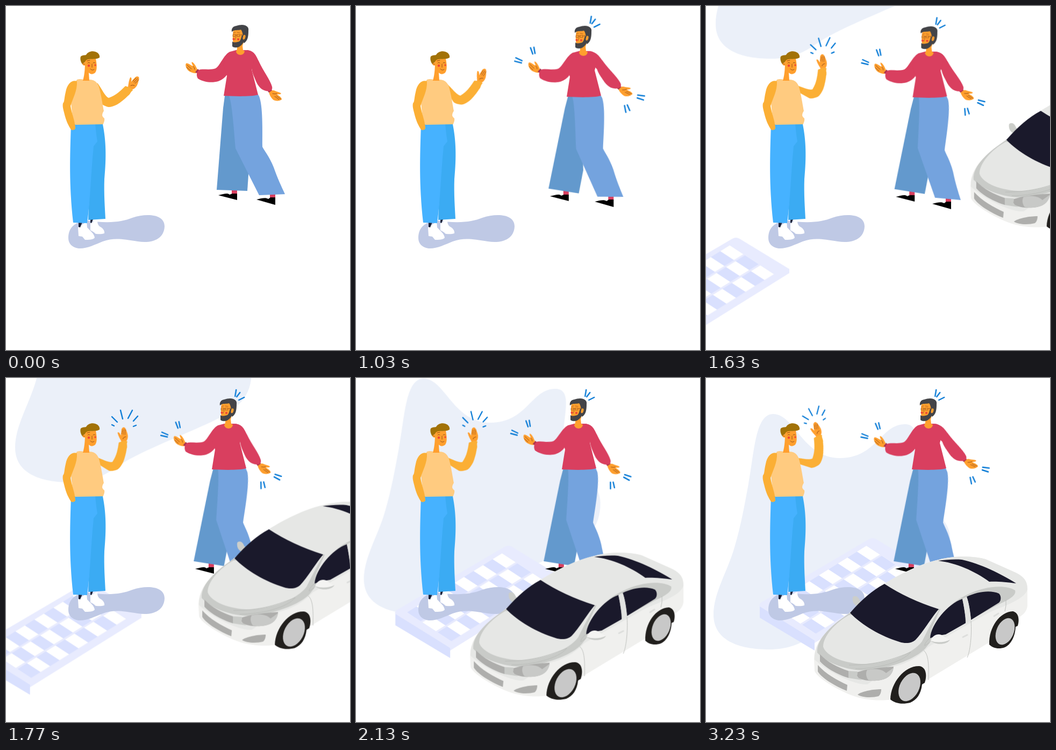
Recreate the animation shown at these times as an HTML page without scripts. Size 640 by 640 pixels, loop 5.16 s.

```html
<!DOCTYPE html>
<html lang="en">
<head>
<meta charset="utf-8">
<title>Two friends and a car</title>
<style>
html, body { margin: 0; width: 100%; height: 100%; overflow: hidden; background: #fff; }
svg { display: block; width: 100%; height: 100%; }

.move { animation: 5160ms linear infinite; }
.blob { animation-name: blob; }
.keyboard { animation-name: keyboard; }
.car { animation-name: car; }
.walker { animation-name: walk; }
.leg-b { animation-name: leg-b; transform-origin: 415px 170px; }
.foot-b { animation-name: foot-b; transform-origin: 426px 343px; }
.leg-f { animation-name: leg-f; transform-origin: 445px 170px; }
.foot-f { animation-name: foot-f; transform-origin: 496px 351px; }
.arm-l { animation-name: arm-l; transform-origin: 418px 95px; }
.arm-r { animation-name: arm-r; transform-origin: 458px 93px; }
.wave { animation-name: wave; transform-origin: 172px 153px; }
.pop { animation-name: pop; }
.grow { animation-name: grow; transform-origin: 219px 101px; }

@keyframes blob {
  0%, 25.48% { transform: translate(5px, -520px); animation-timing-function: cubic-bezier(.333, 0, .667, 1); }
  45.83%, 100% { transform: none; }
}
@keyframes keyboard {
  0%, 28.1% { transform: translate(-430px, 225px); animation-timing-function: cubic-bezier(.333, 1, .667, 1); }
  49.96%, 100% { transform: none; }
}
@keyframes car {
  0%, 26.86% { transform: translate(676px, -437px); animation-timing-function: cubic-bezier(.333, 1, .667, 1); }
  46.24%, 100% { transform: none; }
}
@keyframes walk { 0% { transform: none; } 33.72%, 100% { transform: translate(-22px, 3px); } }
@keyframes leg-b { 0% { transform: rotate(0deg); } 18.99%, 100% { transform: rotate(7deg); } }
@keyframes foot-b { 0% { transform: rotate(0deg); } 18.99%, 100% { transform: rotate(-7deg); } }
@keyframes leg-f { 0%, 13.5% { transform: rotate(0deg); } 33.72%, 100% { transform: rotate(8.5deg); } }
@keyframes foot-f { 0%, 13.5% { transform: rotate(0deg); } 33.72%, 100% { transform: rotate(-8.5deg); } }
@keyframes arm-l {
  0% { transform: rotate(0deg); }
  12.21% { transform: rotate(2.6deg); }
  27.71% { transform: rotate(2deg); }
  34.3% { transform: rotate(1deg); }
  37.4% { transform: rotate(3deg); }
  49.03% { transform: rotate(2.8deg); }
  62.6%, 100% { transform: rotate(-.6deg); }
}
@keyframes arm-r {
  0%, 12.21% { transform: rotate(0deg); }
  19.96% { transform: rotate(-11deg); }
  27.71% { transform: rotate(-9.3deg); }
  34.3% { transform: rotate(-1deg); }
  37.4%, 39% { transform: rotate(2.5deg); }
  49.03% { transform: rotate(-10.4deg); }
  51.74%, 100% { transform: rotate(-11.5deg); }
}
@keyframes wave {
  0%, 14.34% { transform: rotate(0deg); }
  27.71% { transform: rotate(-28deg); }
  32% { transform: rotate(-40deg); }
  34.3% { transform: rotate(-36.5deg); }
  37.4%, 39.34% { transform: rotate(-33.5deg); }
  49.03% { transform: rotate(-46.5deg); }
  55.23% { transform: rotate(-57deg); }
  62.6%, 100% { transform: rotate(-50.5deg); }
}
@keyframes pop {
  0%, 12.6% { transform: scale(0); }
  17.44% { transform: scale(1.2); }
  20.74%, 100% { transform: scale(1); }
}
@keyframes grow {
  0%, 23% { transform: scale(0); }
  27.71% { transform: scale(.55); }
  32%, 34.3% { transform: scale(1); }
  49.03%, 100% { transform: scale(.89); }
}

.marks { fill: none; stroke: #0a7bd6; stroke-width: 2.4; stroke-linecap: round; }
.ink { fill: none; stroke: #7d3d14; stroke-width: .8; stroke-linecap: round; }
.seam { fill: none; stroke: #b9bbb8; stroke-width: .9; }
.skin { fill: #ff9f2e; }
.sleeve { fill: #fbaf35; }
.red { fill: #d93f5f; }
.cuff { fill: #a9324f; }
.cheek { fill: #ef4436; }
.dark { fill: #434448; }
.glass { fill: #1a192b; }
.paint { fill: #e6e7e5; }
.trim { fill: #c9cbc8; }
.vent { fill: #aeaeac; }
.tyre { fill: #211f1d; }
.rim { fill: #c8c8c8; }
</style>
</head>
<body>
<svg viewBox="0 0 640 640">
  <defs>
    <pattern id="keys" width="2" height="2" patternUnits="userSpaceOnUse">
      <path fill="#d9e0fe" d="M0 .06h1v.88h-1zM1 1.06h1v.88h-1z"/>
      <path fill="#fff" d="M1 .06h1v.88h-1zM0 1.06h1v.88h-1z"/>
    </pattern>
  </defs>

  <path class="move blob" fill="#ebf0f9" d="M79 197C90 140 91 67 125 67C165 67 180 149 249 149C318 149 325 86 370 86C385 86 390 96 390 112C390 140 380 175 387 205C395 240 454 250 454 298C454 345 430 368 380 392C320 420 240 450 200 478C175 496 150 505 118 505C60 505 14 488 14 440C14 400 40 360 53 315C65 275 72 235 79 197Z"/>

  <g class="move keyboard">
    <path fill="#d9e0fe" d="M100 423L202 488V507L100 446Z"/>
    <path fill="#e8ebfe" d="M102 418L303 300Q310 296 317 300L409 356V364L202 493V488L100 425Q98 421 102 418Z"/>
    <rect width="10" height="3" fill="url(#keys)" transform="matrix(17.7 -11 28.5 18.6 120 421)"/>
  </g>

  <g id="greeter">
    <path fill="#bfc9e5" d="M116 432C116 410 130 402 150 399C190 405 215 402 235 394C262 385 295 387 295 410C294 435 270 442 245 438C215 433 200 431 180 438C165 444 150 452 135 451C122 449 116 441 116 432Z"/>
    <path fill="#fff" d="M134 412L150 401L151 412C157 419 164 423 165 431C163 435 153 435 147 435L142 429L135 428Z"/>
    <path fill="#fff" d="M157 404L170 398C170 404 171 407 174 410C180 413 184 418 183 423C178 425 170 424 167 424C163 420 160 419 157 417Z"/>
    <path fill="#1b2238" d="M135 402H142L138 412L135 411ZM157 397H162L159 404L157 403Z"/>
    <path fill="#3babf3" d="M160 220H180C186 250 187 280 183 322C182 350 184 375 185 396L153 398Z"/>
    <path fill="#46b2ff" d="M121 220H166C167 230 168 241 170 252L163 261C158 310 157 360 151 404L125 403C117 330 119 280 121 220Z"/>

    <g class="move wave">
      <path class="skin" d="M227 151C228 143 229 137 231 133C234 132 234 137 233 141C237 136 241 131 244 131C248 131 248 134 247 138C245 146 243 151 238 154C235 156 231 155 227 151Z"/>
      <path class="ink" d="M236 140L242 134M238 142L245 135M240 144L247 137M232 148Q236 146 239 148"/>
      <path class="sleeve" d="M170 143C179 155 184 168 191 171C205 166 213 158 222 149C230 151 235 153 236 157C231 160 231 165 227 167C212 182 200 188 191 188C184 187 177 182 176 180L168 160Z"/>
      <g transform="rotate(36.5 172 153)">
        <path class="move marks grow" d="M197 72L207 82M213 60L217 76M235 60L227 75M245 71L237 80M197 87L201 89M237 90L242 88"/>
      </g>
    </g>

    <path fill="#ffcb80" d="M132 137C140 134 144 138 150 138C158 135 168 138 172 148C176 158 180 185 182 195C178 202 178 205 183 209C184 214 181 218 181 220L129 221C122 210 123 190 120 175C124 160 126 150 128 143Z"/>
    <path class="sleeve" d="M132 140C124 137 114 143 111 160C108 172 109 178 106 181C105 186 106 190 108 198C112 215 116 222 121 230C125 232 128 230 129 228C129 215 122 200 120 186C124 172 133 158 132 140Z"/>
    <path class="skin" d="M147 99L167 98C169 108 170 119 166 124C161 128 157 127 154 124L155 139H143C147 125 147 112 147 99Z"/>
    <path fill="#a27207" d="M144 110C140 107 137 99 139 94C142 91 146 92 149 91C152 85 160 83 166 85C172 87 175 91 174 96C168 100 160 98 154 99C148 99 147 104 144 110Z"/>
    <circle class="skin" cx="145.500" cy="108" r="2.800"/>
    <circle class="cheek" cx="154" cy="111" r="2.200"/><circle class="cheek" cx="166" cy="110" r="1.700"/>
    <path class="ink" d="M152 106Q154 104 156 106M162 106Q164 104 166 106M160 108V114M157 117Q160 121 164 118M151 102L156 101M144 107L146 109"/>
  </g>

  <g class="move walker">
    <g class="move leg-b">
      <g class="move foot-b">
        <path class="red" d="M420 340H430V350H420Z"/>
        <path d="M395 352C405 350 412 347 416 351L421 349H430V361Z"/>
      </g>
      <path fill="#6399cd" d="M408 160L404 190L392 342L449 344L452 300L430 160Z"/>
    </g>
    <g class="move leg-f">
      <g class="move foot-f">
        <path class="red" d="M491 348H501V357H491Z"/>
        <path d="M466 360C476 357 484 356 488 359L492 356H501V370Z"/>
      </g>
      <path fill="#74a3de" d="M413 160H466L471 168C478 186 477 230 477 262C480 268 490 280 498 300C505 320 512 335 519 350L471 352L427 265C424 230 421 190 417 174Z"/>
    </g>

    <g class="move arm-r">
      <path class="skin" d="M489 160C493 156 497 156 501 158C505 160 510 160 512 163C510 165 507 164 504 164C509 168 513 170 513 174C509 177 502 177 498 175C493 171 490 165 489 160Z"/>
      <path class="ink" d="M496 163Q500 164 504 163M500 168L508 174M503 167L511 173"/>
      <path class="cuff" d="M486 157L492 151L495 157L489 161Z"/>
      <path class="red" d="M448 82C462 83 465 92 470 102C478 120 492 138 495 150C497 158 489 159 484 158C475 156 470 150 466 142C462 132 458 125 457 116L446 100Z"/>
      <g transform="rotate(9.300 458 93) translate(18 -2)">
        <path class="move marks pop" style="transform-origin:494px 162px" d="M516 168L528 170M515 173L526 177M492 186L494 198M497 185L501 195"/>
      </g>
    </g>

    <g class="move arm-l">
      <path class="skin" d="M356 118C353 111 350 106 346 104C344 106 348 110 348 112C343 110 337 105 335 107C333 110 335 115 338 119C342 123 348 125 354 125Z"/>
      <path class="ink" d="M337 110L345 117M336 114L343 120M348 112Q351 114 351 118"/>
      <path class="cuff" d="M352 123L357 117L361 121L357 126Z"/>
      <path class="red" d="M417 85C405 90 398 112 390 116C380 120 365 116 359 119C354 123 354 130 357 135C370 143 385 143 395 140C403 137 408 132 411 128L425 100Z"/>
      <g transform="rotate(-2 418 95) translate(18 -2)">
        <path class="move marks pop" style="transform-origin:327px 115px" d="M294 98L305 103M292 104L304 107M320 80L324 91M326 79L328 90"/>
      </g>
    </g>

    <path class="red" d="M405 167L411 130L404 108C408 96 412 87 417 85L428 82H445C455 81 462 88 463 95L457 118L469 165C455 169 425 168 405 167Z"/>
    <path class="skin" d="M423 45L441 42L443 62C443 66 441 70 440 74L441 82L444 84C443 93 430 93 428 85L430 80V74H426C421 70 421 55 423 45Z"/>
    <path class="dark" d="M421 66C424 69 430 67 434 66C437 63 438 58 439 53L445 60C443 66 440 72 435 75C431 78 424 78 421 75Z"/>
    <path class="dark" d="M420 48C419 42 422 38 428 37C434 35 440 34 445 36C449 38 452 40 451 46C451 56 450 64 443 69C440 66 441 60 441 55C440 50 439 46 437 44C431 46 426 43 420 48Z"/>
    <ellipse class="skin" cx="443" cy="58" rx="2.300" ry="4.500" transform="rotate(15 443 58)"/>
    <circle class="cheek" cx="423.500" cy="61.500" r="2"/><circle class="cheek" cx="432" cy="62" r="2"/>
    <path class="ink" stroke-opacity=".7" d="M422.500 53h4.500v3.500h-4.500zM430 53h5v3.500h-5zM427 54H430M435 54L440 53M423 50L427 49M430 49L435 50M428 57L426 63M424 70Q427 73 430 70"/>
    <g transform="translate(17.200 -2)">
      <path class="move marks pop" style="transform-origin:420px 52px" d="M433 21L431 33M440 26L434 34M448 35L438 40"/>
    </g>
  </g>

  <g class="move car">
    <path fill="#ccceca" d="M273 408C277 403 284 407 286 414L292 420L280 424C274 421 272 414 273 408Z"/>
    <path fill="#f0f0ee" d="M201 522C202 500 212 482 232 466L332 383C360 365 400 345 433 338C460 330 500 331 520 337L576 362C592 370 598 378 598 392V424C597 434 590 441 581 446L530 490L406 565L345 598C320 602 290 598 270 590C240 578 205 556 202 545Z"/>
    <path class="paint" d="M202 516C204 500 214 480 232 466L332 383C360 365 400 345 433 338C460 330 500 331 520 337L576 362C592 370 598 378 598 394C590 415 550 424 520 440L414 500C395 520 372 532 349 537L300 570C275 572 225 545 202 524Z"/>
    <path class="trim" d="M268 437C235 458 205 485 207 511C225 532 270 546 300 544C345 540 398 520 412 498L420 488L470 462L545 421C565 412 578 404 575 395C558 384 520 386 486 403C455 417 435 440 416 474L436 430Z"/>
    <path class="paint" d="M266 441C240 456 218 480 218 500C224 519 262 533 300 532C340 529 384 514 402 490C410 474 422 450 433 432Z"/>
    <path class="seam" d="M278 541C315 541 365 530 381 510C350 522 320 534 266 534"/>
    <path class="glass" d="M332 383Q376 412 433 430C420 445 402 475 390 487C384 493 372 495 360 491C325 480 290 460 268 437Q300 400 332 383Z"/>
    <path class="glass" d="M432 340C446 338 462 337 476 338C510 345 550 365 577 382C560 380 540 378 527 379C500 359 465 344 432 340Z"/>
    <path class="glass" d="M417 484C419 457 450 420 477 411C480 425 483 443 483 456L446 477L428 480ZM485 407C505 397 530 394 545 401C550 406 549 415 545 418L493 450C491 432 489 418 485 407Z"/>
    <path fill="#e2e3e1" d="M477 411L485 407C489 418 492 435 493 451L484 456C483 443 480 425 477 411Z"/>
    <path class="vent" d="M212 514C225 528 246 539 265 545V558C245 552 222 539 212 527ZM208 534C222 550 245 563 263 571L262 582C240 573 216 559 208 546ZM282 589C290 583 310 579 326 579C326 585 324 590 321 592C310 595 290 595 282 589Z"/>
    <path class="trim" d="M265 545L282 546L281 556L290 562L265 558Z"/>
    <path class="vent" d="M282 547C300 541 330 538 349 537C348 550 340 559 325 562C310 565 283 563 281 554Z"/>
    <path fill="#c8c9c7" d="M300 543C312 540 328 541 335 549L349 539C347 551 340 559 325 562C315 564 306 563 302 562C297 555 297 548 300 543Z"/>
    <path class="seam" d="M405 507C416 515 414 545 414 562M493 452C495 480 491 510 486 520M558 413Q559 424 556 434M417 484C408 490 406 498 407 498L416 492"/>
    <path fill="none" stroke="#dddedc" stroke-width="3" stroke-linecap="round" d="M478 482L486 478M536 443L544 438"/>
    <path fill="#f4f4f2" d="M418 489C421 479 430 475 438 478L454 488C448 495 428 497 418 489Z"/>
    <path class="trim" d="M418 489Q436 495 454 487C449 496 428 498 418 489Z"/>

    <path class="tyre" d="M343 598C344 566 370 535 397 536C411 538 411 556 407 567L402 570C400 588 392 599 380 604C364 608 351 605 343 598Z"/>
    <ellipse class="rim" cx="378.500" cy="575" rx="18" ry="28" transform="rotate(27 378.500 575)"/>
    <path class="tyre" d="M527 496C526 463 547 435 571 434C583 437 583 452 580 461L576 463C575 482 567 496 556 501C545 505 534 503 527 496Z"/>
    <ellipse class="rim" cx="556.500" cy="471.500" rx="16" ry="26" transform="rotate(23 556.500 471.500)"/>
  </g>
</svg>
</body>
</html>
```
